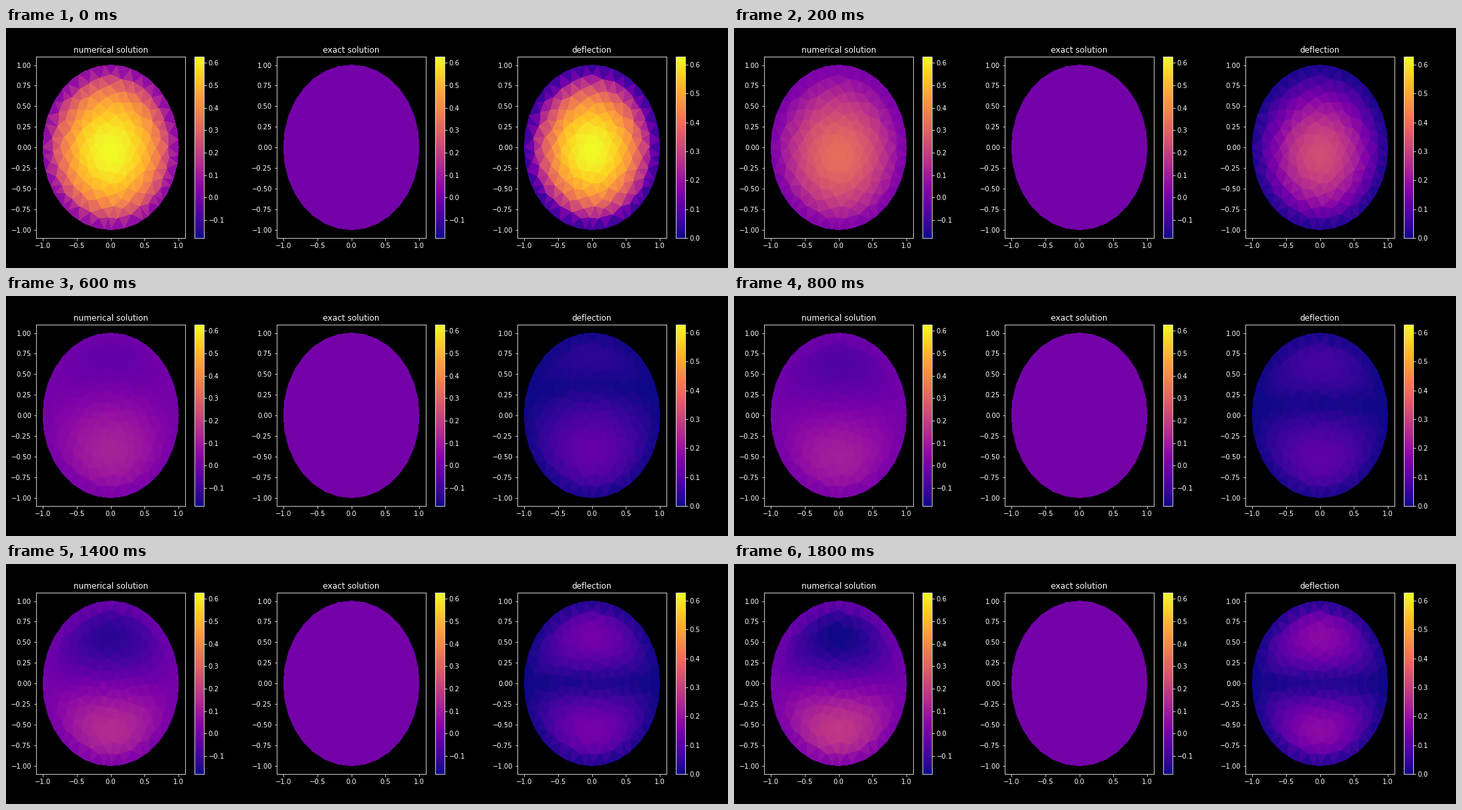
A matplotlib script that plays this animation: 1080x360 px, repeating every 2 s.

```python
import numpy as np
import matplotlib.pyplot as plt
from matplotlib.animation import FuncAnimation
from matplotlib.tri import Triangulation

W, H, DPI = 1080, 360, 72
VMIN, VMAX = -0.18, 0.627
SIDES, INNER = 32, 150
DT, SOURCE = 0.2, 2.0
# time step on view in each 200 ms slot; two of them are held
STEPS = [0, 1, 2, 3, 4, 5, 5, 7, 7, 9]


def triangles(p):
    """Delaunay triangles and their areas, without slivers on the rim."""
    t = Triangulation(p[:, 0], p[:, 1]).triangles
    a, b, c = p[t[:, 0]], p[t[:, 1]], p[t[:, 2]]
    d, e = b - a, c - a
    area = (d[:, 0] * e[:, 1] - d[:, 1] * e[:, 0]) / 2
    keep = np.abs(area) > 1e-5
    return t[keep], np.abs(area[keep])


def make_mesh():
    """Irregular mesh of a 32-sided disc; rim nodes come first."""
    ang = 2 * np.pi * np.arange(SIDES) / SIDES
    corners = np.column_stack([np.cos(ang), np.sin(ang)])
    mids = (corners + np.roll(corners, -1, axis=0)) / 2
    rim = np.vstack([corners, mids])

    rng = np.random.default_rng(7)
    i = np.arange(INNER)
    r = 0.86 * np.sqrt((i + 0.5) / INNER)
    a = i * np.pi * (3 - np.sqrt(5))
    inner = np.column_stack([r * np.cos(a), r * np.sin(a)])
    inner += rng.normal(0, 0.03, inner.shape)
    p = np.vstack([rim, inner])

    for _ in range(6):
        t, area = triangles(p)
        total, weight = np.zeros_like(p), np.zeros(len(p))
        centre = p[t].mean(axis=1)
        for k in range(3):
            np.add.at(total, t[:, k], centre * area[:, None])
            np.add.at(weight, t[:, k], area)
        n = len(rim)
        p[n:] = total[n:] / weight[n:, None]
    return p, triangles(p), len(rim)


def solve_heat(p, t, area, n_rim):
    """Implicit Euler for u_t = lap(u) - c t y with u = 0 on the rim."""
    n = len(p)
    mass, stiff = np.zeros((n, n)), np.zeros((n, n))
    mass_ref = (np.ones((3, 3)) + np.eye(3)) / 12
    for tri, s in zip(t, area):
        q = p[tri]
        edge = np.roll(q, -1, axis=0) - np.roll(q, 1, axis=0)
        ix = np.ix_(tri, tri)
        mass[ix] += s * mass_ref
        stiff[ix] += edge @ edge.T / (4 * s)
    free = slice(n_rim, n)
    system = (mass + DT * stiff)[free, free]
    u, states = np.ones(n), []
    for k in range(max(STEPS) + 1):
        load = -SOURCE * DT * (k + 1) * p[:, 1]
        rhs = mass @ (u + DT * load)
        u = np.zeros(n)
        u[free] = np.linalg.solve(system, rhs[free])
        states.append(u)
    return states


points, (tris, areas), rim_count = make_mesh()
states = solve_heat(points, tris, areas, rim_count)
mesh = Triangulation(points[:, 0], points[:, 1], tris)

plt.style.use("dark_background")
plt.rcParams.update({"font.family": "DejaVu Sans", "font.size": 10})
fig = plt.figure(figsize=(W / DPI, H / DPI), dpi=DPI)


def panel(col, title, vmin):
    left, bottom, width, height = 45 + 360 * col, 45, 279, 271.8
    ax = fig.add_axes([left / W, bottom / H, 0.8 * width / W, height / H])
    cax = fig.add_axes([(left + 0.85 * width) / W, bottom / H,
                        height / 20 / W, height / H])
    art = ax.tripcolor(mesh, np.zeros(len(points)), cmap="plasma",
                       vmin=vmin, vmax=VMAX)
    ax.set(xlim=(-1.1, 1.1), ylim=(-1.1, 1.1),
           xticks=np.linspace(-1, 1, 5), yticks=np.linspace(-1, 1, 9))
    ax.set_title(title, fontsize=12)
    first = -0.1 if vmin < 0 else 0.0
    fig.colorbar(art, cax=cax, ticks=np.arange(round(first * 10), 7) / 10)
    return art


numeric = panel(0, "numerical solution", VMIN)
exact = panel(1, "exact solution", VMIN)
error = panel(2, "deflection", 0)


def draw(i):
    u = states[STEPS[i]]
    numeric.set_array(u[tris].mean(axis=1))
    error.set_array(np.abs(u)[tris].mean(axis=1))
    return numeric, error


anim = FuncAnimation(fig, draw, frames=len(STEPS), interval=200,
                     repeat=True, repeat_delay=0, blit=False)
plt.show()
```
